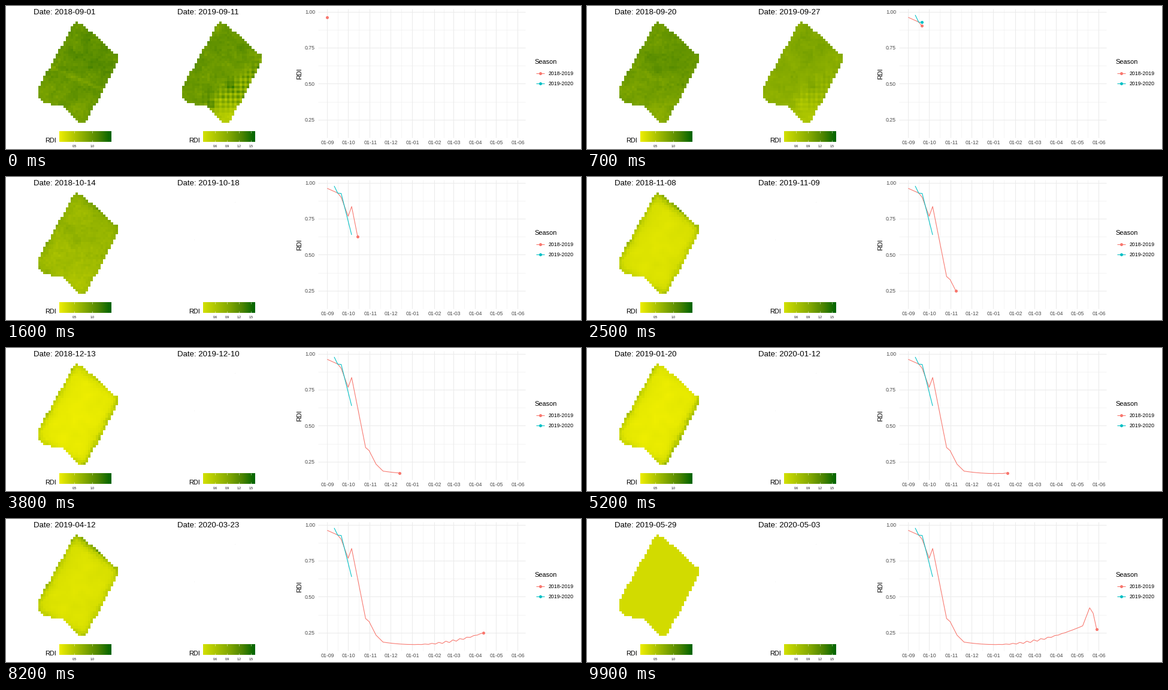
Animation of 960 by 240 pixels, one loop 10000 ms. Source, as a matplotlib script:

```python
import numpy as np
import matplotlib.pyplot as plt
from matplotlib.animation import FuncAnimation
from matplotlib.colors import LinearSegmentedColormap
from matplotlib.path import Path

W, H, DPI = 960, 240, 100
FRAMES, INTERVAL = 100, 100
PT = 72 / DPI
ROWS, COLS, CELL = 41, 32, 4.14
LEFT, TOP, SHIFT = 54, 26, 240
RED, TEAL, GRID, GREY = "#F8766D", "#00BFC4", "#EBEBEB", "#4D4D4D"

plt.rcParams["font.family"] = "Liberation Sans"
fig = plt.figure(figsize=(W / DPI, H / DPI), dpi=DPI, facecolor="white")
ax = fig.add_axes([0, 0, 1, 1])
ax.axis("off")


def text(x, y, s, size, color="black", ha="left", **kw):
    return ax.text(x, y, s, fontsize=size * PT, color=color, ha=ha,
                   va="baseline", **kw)


def line(xs, ys, color, width=1.07, **kw):
    return ax.plot(xs, ys, color=color, lw=width * PT,
                   solid_capstyle="butt", **kw)[0]


def dot(x, y, color):
    return ax.plot([x], [y], "o", color=color, ms=5 * PT, mew=0, zorder=5)[0]


# ---- colour scales -------------------------------------------------------
def scale(low, lo, hi):
    stops = [(0, low), (0.5, "#82A800"), (0.75, "#4D8500"), (1, "#006400")]
    return LinearSegmentedColormap.from_list("rdi", stops), lo, hi


def colour(values, sc):
    cmap, lo, hi = sc
    return cmap(np.clip((values - lo) / (hi - lo), 0, 1))


SCALES = scale("#EEEE00", 0.09, 1.51), scale("#D2E000", 0.3, 1.6)

# ---- field geometry ------------------------------------------------------
X, Y = np.meshgrid(LEFT + (np.arange(COLS) + 0.5) * CELL,
                   TOP + (np.arange(ROWS) + 0.5) * CELL)
OUTLINE = [(116, 24.5), (131, 33.5), (180, 78), (188, 79.5), (187.5, 91),
           (133, 196), (124.5, 196), (95, 168.5), (66, 163), (54, 151),
           (54, 137)]
INSIDE = Path(OUTLINE).contains_points(
    np.c_[X.ravel(), Y.ravel()]).reshape(X.shape)

rng = np.random.default_rng(7)


def noise(passes=0):
    z = rng.normal(size=X.shape)
    for _ in range(passes):
        for axis in (0, 1):
            z = (np.roll(z, 1, axis) + z + np.roll(z, -1, axis)) / 3
    return z / z.std()


def blob(x, y, r):
    return np.exp(-((X - x) ** 2 + (Y - y) ** 2) / (2 * r * r))


def dist(x0, y0, x1, y1):
    """Signed distance of each cell from a line, positive above it."""
    dx, dy = x1 - x0, y1 - y0
    return ((X - x0) * dy - (Y - y0) * dx) / np.hypot(dx, dy)


def border(*ends):
    return np.exp(-np.abs(dist(*ends)) / 5) * rng.uniform(0.65, 1.35, X.shape)


NORTH_WEST = border(52, 140, 116, 24)
NORTH_EAST = border(119, 26, 184, 80)
SOUTH_EAST = border(188, 89, 131, 197)
SOUTH_WEST = border(54, 152, 80, 167)

stripe = np.exp(-(dist(78, 104, 160, 140) / 4) ** 2)
south = blob(125, 192, 24)
EARLY = (0.02 + 0.035 * noise(2) + 0.03 * noise() - 0.13 * stripe
         + 0.09 * blob(150, 85, 35) - 0.09 * blob(75, 145, 22) - 0.06 * south)
AUTUMN = (0.03 * noise(1) + 0.035 * noise() + 0.22 * blob(102, 88, 8)
          + 0.2 * blob(116, 106, 7) + 0.1 * blob(150, 85, 25) - 0.2 * south)
LATE = 0.012 * noise(2)

# Second season: cross-hatching in the south-east, pale southern tip
corner = 1 / (1 + np.exp(dist(88, 168, 188, 92) / 5))
hatch = ((-1.0) ** np.arange(ROWS)[:, None] + (-1.0) ** np.arange(COLS)) / 2
NEXT_EARLY = (1.08 + 0.04 * noise(2) + 0.025 * noise()
              + 0.05 * blob(150, 70, 30) - 0.1 * blob(125, 65, 7)
              + corner * (0.28 * hatch * np.clip((185 - Y) / 30, 0, 1) - 0.18)
              + 0.35 * blob(134, 134, 6) + 0.35 * blob(102, 165, 5)
              - 0.4 * blob(132, 188, 20))
NEXT_AUTUMN = (0.79 + 0.04 * noise(1) + 0.015 * noise()
               + 0.12 * blob(130, 60, 35) - 0.2 * blob(120, 180, 28))


# ---- season means --------------------------------------------------------
def winter(d):
    """Shallow bowl with a short late-winter ripple."""
    ripple = 0.007 * np.cos(np.pi * d / 5) * np.exp(-((d - 178) / 30) ** 2)
    return 0.167 + 0.13 * ((d - 125) / 125) ** 2 + ripple


decline = [(0, .9625), (15, .93), (20, .90), (30, .768), (35, .836),
           (55, .348), (60, .327), (70, .232)]
spring = [(260, .423), (265, .385), (270, .275)]
flat = np.arange(80, 251, 5)
FIRST = np.vstack([decline, np.c_[flat, winter(flat)], spring])
SECOND = np.array([(10, .979), (15, .929), (20, .927), (35, .638)])


def first_field(day):
    swing = np.cos(2 * np.pi * (day - 142) / 200)
    shade = np.interp(day, [35, 60, 225, 268], [0, 1, 1, 0])
    edges = shade * (0.4 * NORTH_WEST + (0.4 - 0.3 * swing) * NORTH_EAST
                     + (0.36 + 0.14 * swing) * SOUTH_EAST + 0.2 * SOUTH_WEST)
    early = np.interp(day, [0, 32], [1, 0])
    autumn = np.interp(day, [0, 32, 58], [0, 1, 0])
    return (np.interp(day, *FIRST.T) - 0.05 * shade + edges
            + early * EARLY + autumn * AUTUMN + shade * LATE)


def second_field(day):
    k = min(day / 25, 1)
    return NEXT_EARLY * (1 - k) + NEXT_AUTUMN * k


# ---- maps and colour bars ------------------------------------------------
def raster(x0):
    box = (LEFT + x0, LEFT + x0 + COLS * CELL, TOP + ROWS * CELL, TOP)
    return ax.imshow(np.zeros((ROWS, COLS, 4)), interpolation="nearest",
                     extent=box, aspect="auto", zorder=3)


def colour_bar(x0, sc, ticks):
    _, lo, hi = sc
    ramp = colour(np.linspace(lo, hi, 200)[None, :], sc)
    ax.imshow(ramp, extent=(89 + x0, 175.5 + x0, 228, 210), aspect="auto")
    text(64.7 + x0, 229, "RDI", 11)
    for v in ticks:
        x = 89 + x0 + 86.3 * (v - lo) / (hi - lo)
        for y in (210, 224.5):
            line([x, x], [y, y + 3.4], "white", 0.5)
        text(x, 236.8, f"{v:.1f}", 5, ha="center")


maps = [raster(0), raster(SHIFT)]
colour_bar(0, SCALES[0], [0.5, 1.0])
colour_bar(SHIFT, SCALES[1], [0.6, 0.9, 1.2, 1.5])
titles = [text(46 + x0, 14.3, "", 13.2) for x0 in (0, SHIFT)]
specks = ax.plot([381.5, 313.5], [41.5, 104.5], "s", color="#F0F0F0",
                 ms=PT, mew=0)[0]


# ---- chart ---------------------------------------------------------------
def px(day):
    return 536.3 + 1.165 * day


def py(v):
    return 10 + (1 - v) * 240.9


def grid_x(day, width=1.07):
    line([px(day)] * 2, (5, 220.5), GRID, width)


def grid_y(v, width=1.07):
    line((521, 867), [py(v)] * 2, GRID, width)


months = np.arange("2018-09", "2019-07", dtype="datetime64[M]")
days = (months.astype("datetime64[D]") - np.datetime64("2018-09-01")).astype(int)
for d in (days[1:] + days[:-1]) / 2:
    grid_x(d, 0.53)
for v in (0.375, 0.625, 0.875):
    grid_y(v, 0.53)
for m, d in zip(months, days):
    grid_x(d)
    text(px(d) + 1, 232.2, f"01-{str(m)[5:]}", 8.8, GREY, "center")
for v in (0.25, 0.5, 0.75, 1):
    grid_y(v)
    text(516, py(v) + 3.1, f"{v:.2f}", 8.8, GREY, "right")
text(493.3, 113.5, "RDI", 11, ha="center", rotation=90,
     rotation_mode="anchor")

text(882.5, 97, "Season", 11)
for y, c, s in ((112.7, RED, "2018-2019"), (129.9, TEAL, "2019-2020")):
    line([885, 899], [y, y], c)
    dot(892, y, c)
    text(905.7, y + 3.2, s, 8.8)

curves = [(series, line([], [], c, zorder=4), dot(0, 0, c))
          for series, c in ((FIRST, RED), (SECOND, TEAL))]

ax.set_xlim(0, W)
ax.set_ylim(H, 0)


def reveal(series, curve, head, day):
    xs, ys = series.T
    end = min(day, xs[-1])
    seen = xs < end
    tip = np.interp(end, xs, ys)
    if day < xs[0]:
        curve.set_data([], [])
    else:
        curve.set_data(px(np.append(xs[seen], end)),
                       py(np.append(ys[seen], tip)))
    head.set_data([px(end)], [py(tip)])
    head.set_visible(xs[0] <= day <= xs[-1])


def paint(image, values, sc, alpha=1.0):
    rgba = colour(values, sc)
    rgba[..., 3] = INSIDE * alpha
    image.set_data(rgba)


def draw(i):
    spans = (270, 235)
    starts = ("2018-09-01", "2019-09-11")
    for title, start, span in zip(titles, starts, spans):
        title.set_text(f"Date: {np.datetime64(start) + i * span // 99}")
    day, next_day = (i * s / 99 for s in spans)
    fade = np.clip((34 - next_day) / 9, 0, 1)
    paint(maps[0], first_field(day), SCALES[0])
    paint(maps[1], second_field(next_day), SCALES[1], fade)
    specks.set_visible(fade == 0)
    for series, curve, head in curves:
        reveal(series, curve, head, day)
    return []


anim = FuncAnimation(fig, draw, frames=FRAMES, interval=INTERVAL,
                     init_func=lambda: draw(0), repeat=True, repeat_delay=0)
plt.show()
```
